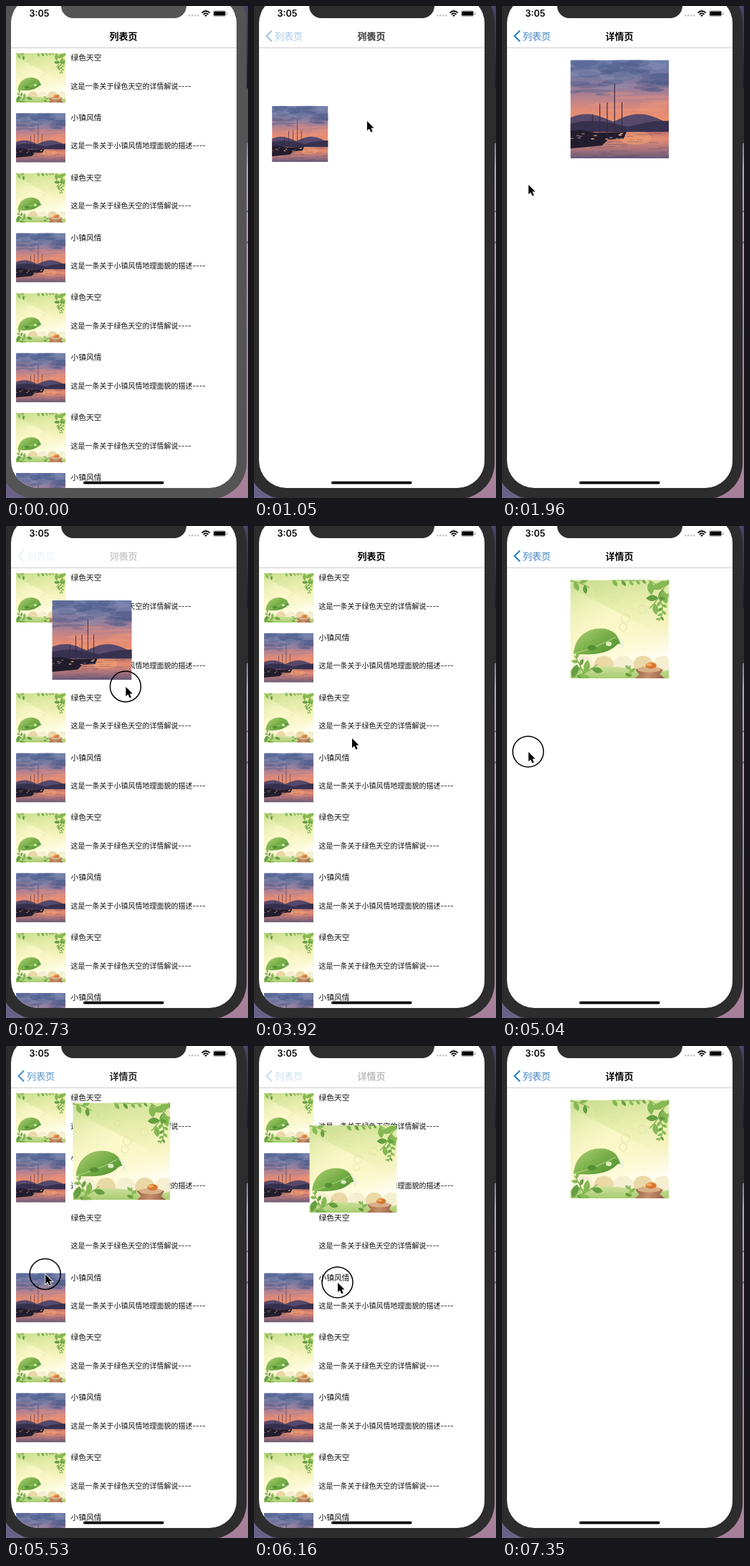
An HTML page with a canvas that plays this animation: 338 by 688 pixels, repeating every 7420 ms.

```html
<!DOCTYPE html>
<html lang="zh">
<head>
<meta charset="utf-8">
<style>
html, body { margin: 0; width: 100%; height: 100%; overflow: hidden; }
canvas { display: block; }
</style>
</head>
<body>
<canvas id="stage" width="338" height="688"></canvas>
<script>
const c = document.getElementById('stage').getContext('2d');
const LOOP = 7420, ROW = 83.85, THUMB = 69, FULL = 137.5;
const FONT = 'Inter, "Noto Sans CJK SC", "Noto Sans CJK", sans-serif';
const clamp = v => Math.min(1, Math.max(0, v));
const mix = (a, b, k) => a + (b - a) * k;
const ease = k => (k = clamp(k), k * k * (3 - 2 * k));

// Where the pointer rests, from when and until when
const stops = [
  { from: 0, to: 250, x: 348, y: 300 },
  { from: 800, to: 1250, x: 158, y: 161 },
  { from: 1900, to: 2050, x: 37, y: 250 },
  { from: 3100, to: 3150, x: 219, y: 215 },
  { from: 3850, to: 4400, x: 137, y: 297 },
  { from: 4980, to: 5250, x: 37, y: 316 },
  { from: 6160, to: 6350, x: 117, y: 331 },
  { from: 7200, to: LOOP, x: 350, y: 480 }
];

// Each visit: tap a row, look, pull from the left edge, let go (left: 1 returns to the list)
const visits = [
  { row: 1, tap: 840, grab: 1980, drop: 3150, left: 1 },
  { row: 2, tap: 4125, grab: 5000, drop: 6350, left: 0 }
];
const TAP = 95, PUSH = 500, FADE = 260, SETTLE = 300;

function pointer(t) {
  const i = stops.findIndex(s => t <= s.to);
  const b = stops[i], a = stops[i - 1] || b;
  const k = ease((t - a.to) / (b.from - a.to));
  return { x: mix(a.x, b.x, k), y: mix(a.y, b.y, k) };
}

const pulled = t => clamp((pointer(t).x - 47) / 315);
const pulling = (row, d) => ({
  row, open: 1 - d, detail: Math.exp(-6 * d), list: clamp((d - 0.3) / 0.7), covers: d < 0.002
});

// open: 0 is the list, 1 the detail page
function state(t) {
  const v = visits.findLast(v => t >= v.tap + TAP);
  if (!v) return pulling(0, 1);
  if (t < v.grab) {
    const age = t - v.tap - TAP, nav = clamp(age / FADE);
    return { row: v.row, open: ease(age / PUSH), detail: nav, list: 1 - nav, covers: true };
  }
  const held = pulled(Math.min(t, v.drop));
  return pulling(v.row, mix(held, v.left, ease((t - v.drop) / SETTLE)));
}

function fade(x0, y0, x1, y1, ...colors) {
  const g = c.createLinearGradient(x0, y0, x1, y1);
  colors.forEach((col, i) => g.addColorStop(i / (colors.length - 1), col));
  return g;
}
function shape(fill, d) { c.fillStyle = fill; c.fill(new Path2D(d)); }
function line(color, width, d) {
  c.strokeStyle = color; c.lineWidth = width; c.stroke(new Path2D(d));
}
function ring(color, width, x, y, r) {
  c.strokeStyle = color; c.lineWidth = width;
  c.beginPath(); c.arc(x, y, r, 0, 7); c.stroke();
}
function oval(fill, x, y, rx, ry = rx) {
  c.fillStyle = fill; c.beginPath(); c.ellipse(x, y, rx, ry, 0, 0, 7); c.fill();
}
function box(fill, x, y, w, h, r = 0) {
  c.fillStyle = fill; c.beginPath(); c.roundRect(x, y, w, h, r); c.fill();
}
function text(s, x, y, size, color = '#111', weight = 400, align = 'left') {
  c.font = `${weight} ${size}px ${FONT}`;
  c.fillStyle = color; c.textAlign = align;
  c.fillText(s, x, y);
}
function random(seed) {
  return () => (seed = seed * 16807 % 2147483647) / 2147483647;
}

// A bending stem with leaves on alternate sides
function sprig(x, y, turn, bend, count, size) {
  for (let i = 0; i < count; i++) {
    c.save();
    c.translate(x, y); c.rotate(turn);
    box('#86b457', 0, -0.5, size * 0.6, 1);
    c.rotate(i % 2 ? 0.9 : -0.9);
    shape(i % 3 ? '#85b854' : '#669f40', `M0 0Q${size / 2} ${-size / 2} ${size} 0Q${size / 2} ${size / 2} 0 0`);
    c.restore();
    x += Math.cos(turn) * size * 0.55;
    y += Math.sin(turn) * size * 0.55;
    turn += bend;
    size *= 0.94;
  }
}

// Both scenes are drawn in a 100 x 100 square
function meadow() {
  const rnd = random(11);
  box(fade(35, 0, 50, 84, '#cfe196', '#e8eeae', '#f7f4c2', '#fffef2'), 0, 0, 100, 100);
  shape(fade(0, 0, 100, 60, '#fffbd000', '#fffbd0bb', '#fffbd000'), 'M0 8L100 60V82H0z');
  for (let i = 0; i < 6; i++) ring('#cbd68a66', 0.9, 30 + rnd() * 50, 12 + i * 9, 3 + rnd() * 3);
  for (let i = 0; i < 5; i++) oval(i % 2 ? '#ead9a6' : '#f5efd2', 14 + i * 20, 86, 10, 9);
  shape(fade(0, 86, 0, 100, '#d3e3a0', '#a8cb70'), 'M0 92Q30 85 62 90T100 91V100H0z');

  sprig(-2, 1, 0.1, 0.15, 4, 11);
  sprig(38, -1, 0.1, -0.02, 10, 9);
  sprig(74, -3, 0.5, 0.1, 5, 15);
  sprig(99, -3, 1.9, 0.1, 5, 15);
  sprig(90, 18, 1.1, 0.15, 8, 7);
  sprig(15, 100, -1.9, -0.05, 6, 9);
  sprig(2, 99, -0.3, -0.12, 4, 14);
  sprig(62, 98, -1.8, 0.1, 3, 7);

  shape(fade(10, 50, 30, 78, '#a6cb70', '#7fb34d', '#5c9a38'),
    'M3 75Q5 57 20 51Q36 46 46 55Q53 60 54 66Q49 63 45 68Q33 78 3 75');
  line('#bcd88c', 0.7, 'M3 75Q24 70 46 58');
  shape('#eef3d8', 'M46 55Q56 60 54 68Q53 72 50 69Q53 66 46 55');
  oval('#568f37', 22, 69, 4.5, 2.8);
  oval('#dcedbf', 39, 65, 3, 2.2);

  shape(fade(66, 90, 94, 100, '#9b6446', '#c68f6b', '#98634a'), 'M66 91Q80 85 94 91L91 96 96 100H66L70 96z');
  oval('#d8b088', 80, 91, 12, 3);
  oval('#d9762f', 82, 87, 5.5, 3.2);
  oval('#f0ac62', 80, 86, 3, 1.4);
}

function ridge(fill, base, height, wave) {
  c.fillStyle = fill; c.beginPath(); c.moveTo(0, 73);
  for (let x = 0; x <= 100; x += 4) c.lineTo(x, base - height * Math.abs(Math.sin(x / wave + 0.6)));
  c.lineTo(100, 73); c.fill();
}

function harbor() {
  const rnd = random(5);
  box(fade(0, 0, 0, 68, '#6f7fae', '#75789f', '#a87f95', '#e08a78', '#f89460'), 0, 0, 100, 70);
  for (let i = 0; i < 45; i++) {
    const y = rnd() * 38;
    oval(i % 4 ? '#43548555' : '#8f93b455', rnd() * 100, y, 7 + rnd() * 13, 4.5 - y / 12);
  }
  for (let i = 0; i < 12; i++) oval('#f0957a55', 30 + rnd() * 70, 32 + rnd() * 20, 16, 1.8);

  box(fade(0, 70, 0, 100, '#a9636b', '#e58d72', '#b0757b', '#665a78'), 0, 70, 100, 30);
  oval('#f7a56f77', 66, 79, 16, 7);
  ridge('#56496c', 63, 8, 17);
  ridge('#373150', 68, 6, 23);
  for (let i = 0; i < 35; i++) box('#453a5544', rnd() * 90, 74 + rnd() * 25, 5 + rnd() * 18, 0.9);

  shape('#211d2d', 'M0 72L10 71 26 74 57 73 54 80 38 81 32 87 0 90z');
  for (let i = 0; i < 5; i++) {
    const x = 22 + i * 7.5, top = i === 3 ? 24 : 42 + rnd() * 16;
    box('#33293d', x, top, 0.8, 76 - top);
  }
  for (let i = 0; i < 14; i++) box(i % 3 ? '#8d707a' : '#f0b08c', rnd() * 52, 74 + rnd() * 6, 3, 1);
}

function picture(row, x, y, size) {
  c.save();
  c.translate(x, y); c.scale(size / 100, size / 100);
  c.beginPath(); c.rect(0, 0, 100, 100); c.clip();
  row % 2 ? harbor() : meadow();
  c.restore();
}

function list(hidden) {
  for (let i = 0; i < 8; i++) {
    const y = 66 + i * ROW;
    if (i !== hidden) picture(i, 14, y, THUMB);
    text(i % 2 ? '小镇风情' : '绿色天空', 90.5, y + 10, 10.75);
    const note = i % 2 ? '这是一条关于小镇风情地理面貌的描述----' : '这是一条关于绿色天空的详情解说----';
    text(note, 90.5, y + 49.5, 10);
  }
}

function bars(s) {
  c.globalAlpha = s.list;
  text('列表页', 164, 46.5, 13, '#000', 600, 'center');
  c.globalAlpha = s.detail;
  text('详情页', 164, 46.5, 13, '#000', 600, 'center');
  line('#3c84c4', 2.3, 'M25 34.5L17.5 42 25 49.5');
  text('列表页', 29, 46.5, 13, '#3c84c4');
  c.globalAlpha = 1;
  box('#cfcfcf', 7, 58, 315, 1);

  text('3:05', 32.5, 15, 12.5, '#000', 600);
  for (let i = 0; i < 4; i++) box('#c4c4c4', 255 + i * 4, 12, 2.6, 2.6, 1);
  line('#000', 1.7, 'M273.5 9.5Q279 4.5 284.5 9.5M275.6 11.8Q279 8.6 282.4 11.8');
  shape('#000', 'M277 13Q279 11.4 281 13L279 15z');
  box('#aaa', 289, 6.2, 18.6, 8.6, 2.4);
  box('#fff', 289.7, 6.9, 17.2, 7.2, 1.8);
  box('#000', 290.3, 7.5, 16, 6, 1.3);
  box('#999', 308.4, 9, 1, 3, 0.5);
}

function backdrop(bezel) {
  box(fade(0, 0, 0, 688, '#4c446a', '#1e1a3d', '#b5a2c6', '#b597bb', '#9e88ac', '#b28299', '#a5809a'), 169, 0, 169, 688);
  box(fade(0, 0, 0, 688, '#2b2740', '#4a4468', '#6a6288'), 0, 0, 169, 688);
  line('#3a2f4c', 1, 'M335 290L338 286M335 334L338 329');
  box(bezel, 334, 115, 4, 77, 1);
  box(bezel, -8, -28, 344, 717, 50);
}

function cursor(t) {
  const { x, y } = pointer(t);
  const pressed = visits.some(v => (t >= v.tap && t < v.tap + TAP) || (t >= v.grab && t < v.drop));
  c.save();
  c.translate(x, y);
  if (pressed) ring('#000', 1.5, -0.5, -0.5, 21.5);
  const arrow = 'M0 0V13.2L3 10.4 5.3 15.4 7.6 14.4 5.4 9.5H9.5z';
  line('#fff', 1.6, arrow);
  shape('#000', arrow);
  c.restore();
}

function draw(t) {
  const s = state(t);
  const bezel = t > 600 ? '#2d2d2d' : '#545454';
  backdrop(bezel);
  c.save();
  c.beginPath(); c.roundRect(7, -14, 315, 688, 38); c.clip();
  box('#fff', 0, -14, 338, 702);
  if (!s.covers) list(s.row);
  picture(s.row, mix(14, 95.5, s.open), mix(66 + s.row * ROW, 75.5, s.open), mix(THUMB, FULL, s.open));
  bars(s);
  box('#000', 108, 664.8, 112.5, 3.8, 1.9);
  c.restore();
  box(bezel, 77, -24, 175, 41, 17);
  cursor(t);
}

const start = performance.now();
function tick() {
  draw((performance.now() - start) % LOOP);
  requestAnimationFrame(tick);
}
tick();
</script>
</body>
</html>
```
